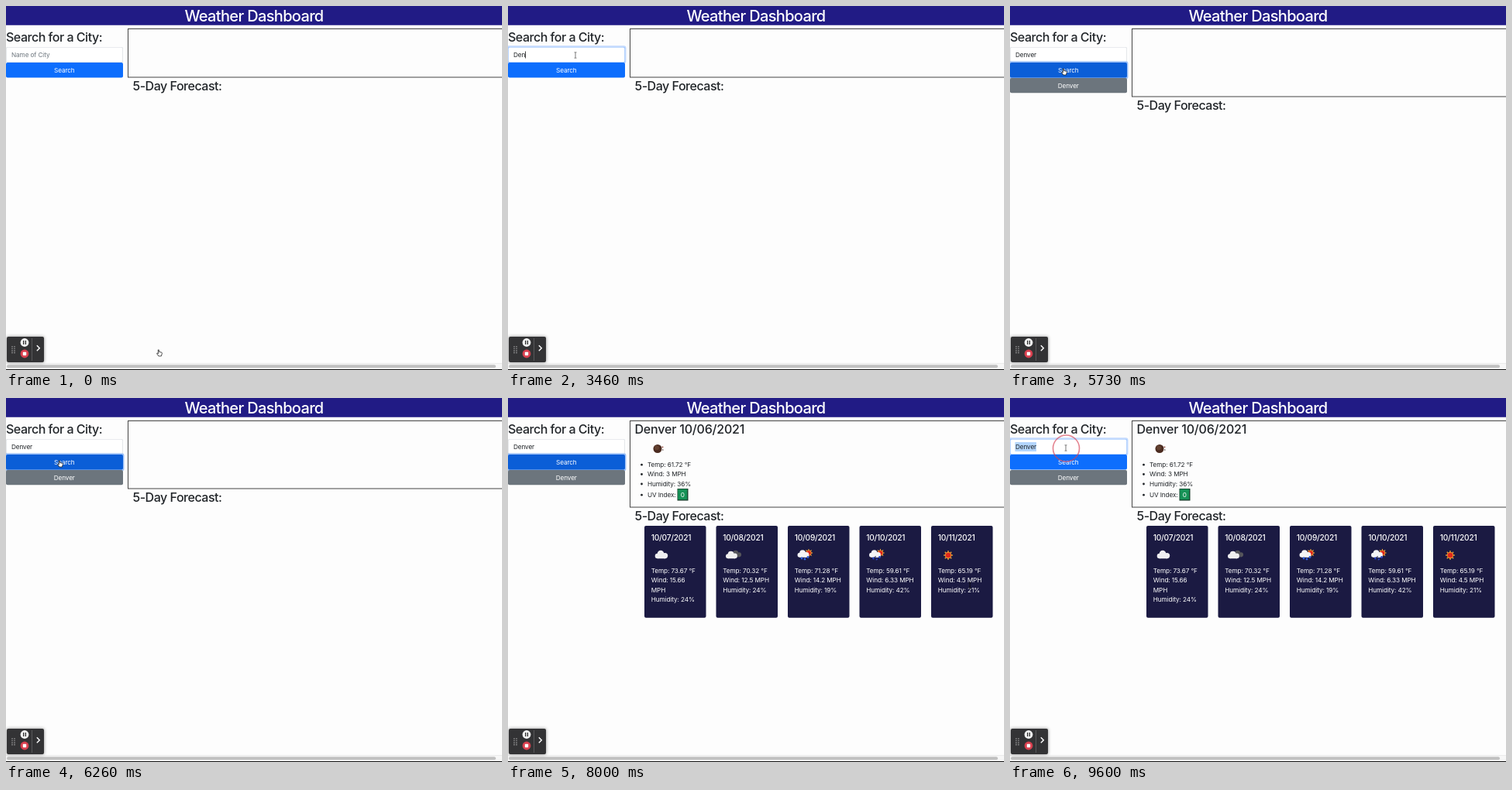
An HTML page with a canvas for the animation above (9660 ms loop, 640 px wide and 470 px high).

```html
<!DOCTYPE html>
<html lang="en">
<head>
<meta charset="utf-8">
<title>Weather Dashboard</title>
<style>
  html, body { margin: 0; width: 100%; height: 100%; overflow: hidden; background: #fdfdfd; }
  canvas { display: block; }
</style>
</head>
<body>
<canvas id="stage" width="640" height="470"></canvas>
<script>
const ctx = document.getElementById('stage').getContext('2d');
const LOOP = 9660;
const INK = '#212529', BLUE = '#0d6efd', GREY = '#6c757d';

// Timeline in ms
const FOCUS = 2150, SEARCH = 5200, RESULTS = 6300, RESELECT = 9400;
const KEYS = [3000, 3160, 3330, 3560, 3720, 3880];
const CITY = 'Denver';
const CLICKS = [[FOCUS, 87, 64], [SEARCH, 70, 85], [RESELECT, 72.5, 65]];
const PATH = [
  [0, 198, 448], [250, 198, 448], [1600, 87, 63.5], [4250, 87, 63.5], [4950, 70, 85],
  [7000, 70, 85], [7900, 596, 242], [8150, 596, 242], [9200, 72, 64.5], [LOOP, 72, 64.5]
];

const TODAY = ['Temp: 61.72 °F', 'Wind: 3 MPH', 'Humidity: 36%', 'UV Index:'];
const DAYS = [
  { date: '10/07/2021', icon: 'cloud', rows: ['Temp: 73.67 °F', 'Wind: 15.66', 'MPH', 'Humidity: 24%'] },
  { date: '10/08/2021', icon: 'overcast', rows: ['Temp: 70.32 °F', 'Wind: 12.5 MPH', 'Humidity: 24%'] },
  { date: '10/09/2021', icon: 'shower', rows: ['Temp: 71.28 °F', 'Wind: 14.2 MPH', 'Humidity: 19%'] },
  { date: '10/10/2021', icon: 'storm', rows: ['Temp: 59.61 °F', 'Wind: 6.33 MPH', 'Humidity: 42%'] },
  { date: '10/11/2021', icon: 'sun', rows: ['Temp: 65.19 °F', 'Wind: 4.5 MPH', 'Humidity: 21%'] }
];

function text(str, x, y, { size = 8.2, color = INK, weight = 400, align = 'left', track = -0.012 } = {}) {
  ctx.font = `${weight} ${size}px Inter, "Open Sans", sans-serif`;
  ctx.letterSpacing = `${size * track}px`;
  ctx.textAlign = align;
  ctx.fillStyle = color;
  ctx.fillText(str, x, y);
}

const heading = (str, x, y, track = -0.03) => text(str, x, y, { size: 16, weight: 500, track });

function box(x, y, w, h, fill, radius = 0) {
  ctx.fillStyle = fill;
  ctx.beginPath();
  ctx.roundRect(x, y, w, h, radius);
  ctx.fill();
}

function dot(x, y, r, fill) {
  ctx.fillStyle = fill;
  ctx.beginPath();
  ctx.arc(x, y, r, 0, Math.PI * 2);
  ctx.fill();
}

function line(points, color, width = 1) {
  ctx.strokeStyle = color;
  ctx.lineWidth = width;
  ctx.beginPath();
  points.forEach(([x, y]) => ctx.lineTo(x, y));
  ctx.stroke();
}

function cloud(x, y, color, s = 1) {
  dot(x - 5 * s, y + 2 * s, 3.3 * s, color);
  dot(x - s, y - s, 4.3 * s, color);
  dot(x + 4.5 * s, y + 1.6 * s, 3.7 * s, color);
  box(x - 5 * s, y + s, 10 * s, 4.3 * s, color);
}

function sun(x, y, s = 1) {
  for (let i = 0; i < 8; i++) {
    const a = i * Math.PI / 4, c = Math.cos(a), d = Math.sin(a);
    line([[x + c * 3 * s, y + d * 3 * s], [x + c * 6 * s, y + d * 6 * s]], '#f0a23c', 1.3 * s);
  }
  dot(x, y, 4.2 * s, '#f3a12f');
  dot(x, y, 3.3 * s, '#e0281c');
}

function rainy(x, y, drop) {
  sun(x + 5, y - 2, 0.85);
  cloud(x - 2, y - 1, '#f4f4f6', 0.9);
  for (const [dx, dy] of [[-4, 5], [0, 6], [4, 3.5]]) dot(x + dx, y + dy, 1.4, drop);
}

const icons = {
  cloud: (x, y) => cloud(x, y, '#efeff1'),
  overcast(x, y) { cloud(x + 4, y - 1, '#55555b', 0.8); cloud(x - 2, y + 0.5, '#f0f0f0', 0.9); },
  shower: (x, y) => rainy(x, y, '#2f5fe0'),
  storm(x, y) {
    rainy(x, y, '#2846c8');
    line([[x - 1, y + 2], [x - 3, y + 5], [x, y + 5], [x - 2, y + 8]], '#20204c', 1);
  },
  sun: (x, y) => sun(x, y + 1)
};

function pointerAt(t) {
  const i = Math.max(1, PATH.findIndex(p => p[0] > t));
  const [t0, x0, y0] = PATH[i - 1], [t1, x1, y1] = PATH[i];
  const u = (t - t0) / (t1 - t0), e = u * u * (3 - 2 * u);
  return [x0 + (x1 - x0) * e, y0 + (y1 - y0) * e];
}

const inside = ([px, py], x, y, w, h) => px >= x && px < x + w && py >= y && py < y + h;
const cardX = i => 176 + i * 92.5;

function drawShape(x, y, points) {
  ctx.beginPath();
  points.forEach(([dx, dy]) => ctx.lineTo(x + dx, y + dy));
  ctx.closePath();
  ctx.fillStyle = '#fff';
  ctx.fill();
  ctx.strokeStyle = '#222';
  ctx.lineWidth = 0.8;
  ctx.stroke();
}

function drawPointer(t, p) {
  const [x, y] = p;
  const overCard = t > RESULTS && DAYS.some((_, i) => inside(p, cardX(i), 165, 79.5, 119));
  const overButton = inside(p, 0, 73, 151, t > SEARCH ? 39 : 20);
  if (overCard || inside(p, 0, 53, 151, 20)) {
    const color = overCard ? '#000' : '#555';
    line([[x, y - 3.5], [x, y + 3.5]], color, 0.8);
    line([[x - 1.5, y - 3.7], [x + 1.5, y - 3.7]], color, 0.7);
    line([[x - 1.5, y + 3.7], [x + 1.5, y + 3.7]], color, 0.7);
  } else if (overButton || t < 350) {
    drawShape(x, y, [[-1.8, -4], [-0.7, -4], [-0.5, -1.4], [2.8, -0.8], [3.4, 0.4],
      [2.4, 4], [-1.2, 4], [-3.4, 0.8], [-2.8, 0], [-1.6, 1]]);
  } else {
    drawShape(x, y, [[-2.5, -4.5], [-2.5, 3.5], [-0.8, 2], [0.4, 4.5], [1.5, 4], [0.4, 1.6], [2.8, 1.5]]);
  }
}

function drawSearch(t, p) {
  const typed = CITY.slice(0, KEYS.filter(k => k <= t).length);
  const inputFocus = (t >= FOCUS && t < SEARCH) || t >= RESELECT;
  const buttonFocus = t >= SEARCH && t < RESELECT;
  const white = { color: '#fff', align: 'center' };

  heading('Search for a City:', 0, 45.5);
  if (inputFocus) box(-2, 51.2, 154.5, 23, '#c3dafe', 3);
  box(0, 53, 151, 20, inputFocus ? '#86b7fe' : '#d3d8dd', 2);
  box(0.6, 53.6, 149.8, 18.8, '#fff', 1.6);
  if (t >= RESELECT) box(6.5, 57, 27.5, 12, '#b3d5fd');
  text(typed || 'Name of City', 7, 66, { color: typed ? INK : GREY });
  if (inputFocus && t < RESELECT && (typed ? t < 4400 : t % 1000 < 500)) {
    const caret = typed ? 7.3 + ctx.measureText(typed).width : 7;
    line([[caret, 58.5], [caret, 67.5]], '#111', 0.8);
  }

  if (buttonFocus) box(-2, 71.2, 154.5, 23, '#9fc2f8', 3);
  box(0, 73, 151, 19.5, buttonFocus || inside(p, 0, 73, 151, 20) ? '#0b5ed7' : BLUE, 2);
  text('Search', 75.3, 86, white);
  if (t >= SEARCH) {
    box(0, 93, 151, 19.2, GREY, 2);
    text(CITY, 75.3, 105.5, white);
  }
}

function drawWeather(t) {
  const bottom = t < SEARCH ? 92 : t < RESULTS ? 117 : 141;
  ctx.strokeStyle = '#444';
  ctx.lineWidth = 1;
  ctx.strokeRect(157.5, 29.5, 500, bottom - 29.5);
  heading('5-Day Forecast:', 163.5, bottom + 17);
  if (t < RESULTS) return;

  heading('Denver 10/06/2021', 163.5, 46, -0.012);
  dot(193, 65.5, 5.5, '#4b2b20');
  dot(192, 64.3, 3, '#62402f');
  dot(199.5, 63.3, 0.9, '#8a3b2c');
  dot(199.8, 67, 0.8, '#574640');
  [89, 101.3, 113.8, 128].forEach((y, i) => {
    dot(172.5, y - 2.8, 1.4, INK);
    text(TODAY[i], 180, y);
  });
  box(218.5, 117, 14, 15.5, '#173d2b');
  box(219.2, 117.7, 12, 13.5, '#169257');
  text('0', 225.3, 127.8, { color: '#fff', align: 'center' });

  DAYS.forEach(({ date, icon, rows }, i) => {
    const x = cardX(i);
    box(x, 165, 79.5, 118.7, '#1b1a42', 2);
    text(date, x + 8.8, 184, { size: 10.2, weight: 500, color: '#fff', track: -0.025 });
    icons[icon](x + 22, 202);
    rows.forEach((row, n) => text(row, x + 8.8, 226 + n * 12.4, { color: '#fff' }));
  });
}

function drawRecorder() {
  ctx.save();
  ctx.shadowColor = 'rgba(0,0,0,.45)';
  ctx.shadowBlur = 4;
  box(1, 427, 48, 33, '#333335', 2);
  ctx.restore();
  for (let i = 0; i < 8; i++) dot(8 + (i % 2) * 3, 440 + (i >> 1) * 2.6, 0.7, '#c8c8c8');
  dot(24, 434.5, 5.4, '#f2f2f2');
  box(22, 432, 1.3, 5, '#333');
  box(24.7, 432, 1.3, 5, '#333');
  dot(24, 449, 5.4, '#d9404f');
  box(21.8, 446.8, 4.4, 4.4, '#fff', 0.6);
  line([[33.5, 429], [33.5, 458]], '#59595b');
  line([[39.8, 438.3], [43.3, 441.8], [39.8, 445.3]], '#fff', 1.4);
}

function drawRipples(t) {
  for (const [start, x, y] of CLICKS) {
    const age = t - start;
    if (age < 0 || age > 400) continue;
    const fade = Math.min(1, (400 - age) / 150);
    ctx.strokeStyle = `rgba(214,64,84,${0.65 * fade})`;
    ctx.lineWidth = 1.6;
    ctx.beginPath();
    ctx.arc(x, y, 17 * Math.min(1, age / 150), 0, Math.PI * 2);
    ctx.stroke();
  }
}

function draw(t) {
  const pointer = pointerAt(t);
  box(0, 0, 640, 470, '#fdfdfd');
  box(0, 0, 640, 24.7, '#211b85');
  text('Weather Dashboard', 320, 20, { size: 20, weight: 500, color: '#fff', align: 'center', track: -0.033 });
  drawSearch(t, pointer);
  drawWeather(t);
  box(0, 461.5, 640, 7.5, '#f7f7f7');
  box(0, 461, 640, 0.7, '#e6e6e6');
  box(1, 463.3, 631, 4, '#c1c1c1', 2);
  box(0, 469, 640, 1, '#111');
  drawRecorder();
  drawRipples(t);
  drawPointer(t, pointer);
}

const origin = performance.now();
function tick() {
  draw((performance.now() - origin) % LOOP);
  requestAnimationFrame(tick);
}
tick();
</script>
</body>
</html>
```
